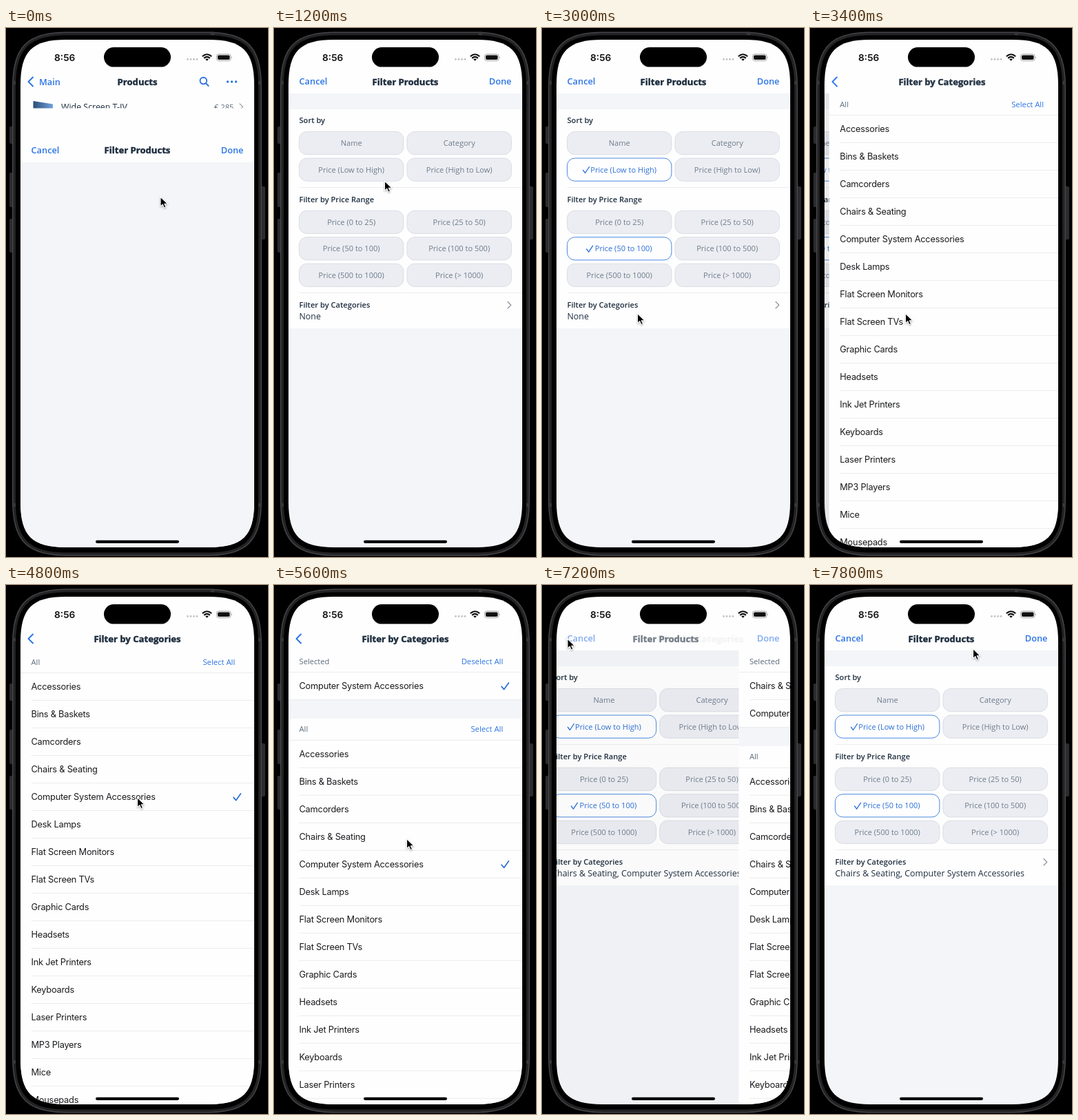
An HTML page for the animation above (8 s loop, 380 px wide and 768 px high).

```html
<!DOCTYPE html>
<html lang="en">
<head>
<meta charset="utf-8">
<title>Filter products</title>
<style>
html, body { margin: 0; width: 100%; height: 100%; overflow: hidden; background: #000; }
svg { display: block; width: 100%; height: 100%; }
text { font-family: "Open Sans", "Noto Sans", sans-serif; fill: #1d2d3e; white-space: pre; }
.title { font-size: 13.1px; font-weight: 700; stroke: #1d2d3e; stroke-width: .45px; }
.link { font-size: 12.8px; font-weight: 600; fill: #2b74e4; }
.label { font-size: 11.1px; font-weight: 600; }
.value { font-size: 12.4px; }
.chip { font-size: 11.05px; fill: #6c7c8c; }
.chip.on { fill: #2b6fd6; }
.group { font-size: 11.2px; fill: #5b6b7c; }
.action { font-size: 11.3px; fill: #2b74e4; }
.row { font-family: Inter, "Liberation Sans", sans-serif; font-size: 12.8px; letter-spacing: -.23px; fill: #1b1c1f; }
.clock { font-family: Inter, "Liberation Sans", sans-serif; font-size: 13.7px; font-weight: 600; fill: #111; }
.line { fill: none; stroke-linecap: round; stroke-linejoin: round; }
</style>
</head>
<body>
<svg viewBox="0 0 380 768" preserveAspectRatio="none">
  <defs>
    <clipPath id="glass"><path id="screen"/></clipPath>
    <clipPath id="body"><rect x="21" y="95" width="339" height="660"/></clipPath>
    <linearGradient id="screenPic" x1="0" x2="1">
      <stop offset="0" stop-color="#2d4d78"/><stop offset="1" stop-color="#6ea2dc"/>
    </linearGradient>
  </defs>
  <rect width="380" height="768" fill="#000"/>
  <g fill="#2c2c2f">
    <rect x="5" y="143" width="6" height="25" rx="2"/>
    <rect x="5" y="210" width="6" height="50" rx="2"/>
    <rect x="5" y="277" width="6" height="49" rx="2"/>
    <rect x="369" y="230" width="7" height="77" rx="2"/>
  </g>
  <path id="rim" fill="#454548"/>
  <path id="band" fill="#232325"/>
  <g fill="#38383a">
    <rect x="9" y="77" width="5" height="5"/><rect x="366" y="77" width="5" height="5"/>
    <rect x="9" y="690" width="5" height="5"/><rect x="366" y="690" width="5" height="5"/>
    <rect x="297" y="5.5" width="5" height="5"/>
  </g>
  <path id="bezel" fill="#000"/>
  <g clip-path="url(#glass)">
    <g id="app"></g>
    <text class="clock" x="70" y="47.5">8:56</text>
    <g fill="#c3c3c6">
      <circle cx="263.5" cy="45.5" r="1.4"/><circle cx="268" cy="45.5" r="1.4"/>
      <circle cx="272.5" cy="45.5" r="1.4"/><circle cx="277" cy="45.5" r="1.4"/>
    </g>
    <path d="M284.8 41.3Q291.5 35.2 298.2 41.3M287.2 43.9Q291.5 40 295.8 43.9" fill="none" stroke="#111" stroke-width="2.1"/>
    <path d="M289.2 45.4Q291.5 43.6 293.8 45.4L291.5 47.8Z" fill="#111"/>
    <rect x="305.5" y="38" width="20.5" height="9.6" rx="3" fill="#fff" stroke="#97979b" stroke-width=".9"/>
    <rect x="307" y="39.5" width="17.5" height="6.6" rx="1.8" fill="#111"/>
    <path d="M327.3 41.2q1.6 1.6 0 3.3z" fill="#97979b"/>
    <rect x="142" y="28" width="97" height="28.6" rx="14.3" fill="#000"/>
    <rect x="130" y="743.7" width="121" height="4.2" rx="2.1" fill="#000"/>
  </g>
  <path id="cursor" d="M0 0V14.2L3.3 11.1L5.5 16.2L8 15.1L5.8 10.2H10.3Z" fill="#000" stroke="#fff" stroke-width="1.1" stroke-linejoin="round" style="filter:drop-shadow(0 1px 1px #0005)"/>
</svg>
<script>
const LOOP = 8000, STEP = 200, LEFT = 21, WIDTH = 339;
const BLUE = "#2b6fd6", PAPER = "#f4f5f8", RULE = "#ebecef", WHITE = "#fefefe";
const $ = id => document.getElementById(id);
const app = $("app"), cursor = $("cursor");

const categories = ["Accessories", "Bins & Baskets", "Camcorders", "Chairs & Seating",
  "Computer System Accessories", "Desk Lamps", "Flat Screen Monitors", "Flat Screen TVs",
  "Graphic Cards", "Headsets", "Ink Jet Printers", "Keyboards", "Laser Printers",
  "MP3 Players", "Mice", "Mousepads"];

// time, x, y
const path = [[0, 224, 245], [400, 222, 244], [1200, 160.5, 222], [1400, 132, 208], [1600, 130, 206],
  [2200, 122, 318], [2400, 122, 318], [3000, 138.5, 414.5], [3600, 138.5, 414.5],
  [4400, 190.5, 308.5], [5000, 190.5, 308.5], [5600, 192.5, 368.5], [6400, 192.5, 368.5],
  [7000, 37, 78], [7200, 37, 78], [7800, 236.5, 92.5]];
const slide = [[3000, 0], [3200, .78], [3400, .98], [3600, 1], [7000, 1], [7200, .22], [7400, .02], [7600, 0]];
const rise = [[0, 99.5], [200, 7], [400, 0]];

function at(keys, t, col = 1, ease = u => u) {
  if (t <= keys[0][0]) return keys[0][col];
  const i = keys.findIndex(k => k[0] >= t);
  if (i < 0) return keys[keys.length - 1][col];
  const a = keys[i - 1], b = keys[i];
  return a[col] + (b[col] - a[col]) * ease((t - a[0]) / (b[0] - a[0]));
}
const smooth = u => u * u * (3 - 2 * u);

// rounded box whose corners ease into the sides
function softBox(id, x, y, w, h, r) {
  const e = r * 1.35, c = r * .34, X = x + w, Y = y + h;
  $(id).setAttribute("d", `M${x + e} ${y}H${X - e}C${X - c} ${y} ${X} ${y + c} ${X} ${y + e}` +
    `V${Y - e}C${X} ${Y - c} ${X - c} ${Y} ${X - e} ${Y}H${x + e}` +
    `C${x + c} ${Y} ${x} ${Y - c} ${x} ${Y - e}V${y + e}C${x} ${y + c} ${x + c} ${y} ${x + e} ${y}Z`);
}

const text = (s, x, y, cls, anchor = "start") =>
  `<text class="${cls}" x="${x}" y="${y}" text-anchor="${anchor}">${s.replace(/&/g, "&amp;")}</text>`;
const rect = (x, y, w, h, fill) => `<rect x="${x}" y="${y}" width="${w}" height="${h}" fill="${fill}"/>`;
const rule = (y, x = 36.5) => rect(x, y, 360 - x, 1, RULE);
const line = (d, color, width) => `<path class="line" d="${d}" stroke="${color}" stroke-width="${width}"/>`;
const group = (s, x = 0, y = 0, opacity = 1) =>
  `<g transform="translate(${x} ${y})" opacity="${opacity}">${s}</g>`;
const backArrow = line("M39 71.5L32.5 78L39 84.5", "#2b74e4", 2);

function productsPage() {
  return rect(LEFT, 17, WIDTH, 737, WHITE) + backArrow +
    text("Main", 48, 82.5, "link") + text("Products", 190.5, 82.5, "title", "middle") +
    `<circle cx="286.3" cy="76.6" r="4.8" fill="none" stroke="#2b74e4" stroke-width="1.9"/>` +
    line("M290 80.4L293.6 84", "#2b74e4", 2) +
    [321.5, 327.5, 333.5].map(x => `<circle cx="${x}" cy="78" r="1.7" fill="#2b74e4"/>`).join("") +
    `<path d="M39.5 106L68 110.5V124H39.5Z" fill="url(#screenPic)"/>` +
    text("Wide Screen T-IV", 80, 119, "value") + text("€ 285", 330.5, 119, "group", "end") +
    line("M339 110L343.5 114.5L339 119", "#9aa2ab", 1.2);
}

function chip(label, col, y, on) {
  const x = col ? 193 : 36.5, mid = x + 75.7, half = label.length * 2.53;
  return `<rect x="${x}" y="${y}" width="151.4" height="33.2" rx="11" fill="${on ? WHITE : "#ecedf2"}" stroke="${on ? "#4b88e0" : "#dadde3"}"/>` +
    text(label, mid + (on ? 6 : 0), y + 20.6, on ? "chip on" : "chip", "middle") +
    (on ? line(`M${mid - half - 4.5} ${y + 17.3}l3 4.2l6 -9`, BLUE, 1.3) : "");
}

function filterForm(t) {
  const low = t >= 1600, mid = t >= 2200, picked = t >= 5000;
  return rect(LEFT, 118, WIDTH, 318, WHITE) +
    text("Sort by", 36.5, 138.3, "label") +
    chip("Name", 0, 150.5) + chip("Category", 1, 150.5) +
    chip("Price (Low to High)", 0, 189, low) + chip("Price (High to Low)", 1, 189) +
    rule(231) + text("Filter by Price Range", 36.5, 253, "label") +
    chip("Price (0 to 25)", 0, 265.2) + chip("Price (25 to 50)", 1, 265.2) +
    chip("Price (50 to 100)", 0, 303.7, mid) + chip("Price (100 to 500)", 1, 303.7) +
    chip("Price (500 to 1000)", 0, 342.2) + chip("Price (> 1000)", 1, 342.2) +
    rule(384) + text("Filter by Categories", 36.5, 406.2, "label") +
    text(picked ? "Chairs & Seating, Computer System Accessories" : "None", 36.5, 422.8, "value") +
    line("M339 397.5L343.7 402.2L339 407", "#8f98a2", 1.3);
}

function section(name, action, items, chosen, y) {
  const rows = items.map((item, i) => {
    const mid = y + 51.8 + 40 * i;
    return text(item, 36.5, mid + 4.6, "row") + rule(mid + 19.2) +
      (chosen.includes(item) ? line(`M330 ${mid + .6}l3.6 4.2l6.8 -9.6`, BLUE, 1.7) : "");
  });
  return text(name, 36.5, y + 19.5, "group") + text(action, 332.3, y + 19.5, "action", "end") +
    rule(y + 31, LEFT) + rows.join("");
}

function categoryList(t) {
  const chosen = categories.filter((c, i) => i === 4 && t >= 4600 || i === 3 && t >= 5800);
  const shown = t >= 5000 ? chosen : [];
  let out = rect(LEFT, 95, WIDTH, 660, WHITE), y = t >= 3600 ? 96 : 95;
  if (shown.length) {
    out += section("Selected", "Deselect All", shown, chosen, 95);
    y = 126 + 40 * shown.length;
    out += rect(LEFT, y, WIDTH, 28, PAPER) + rule(y, LEFT);
    y += 27.8;
  }
  return out + section("All", "Select All", categories, chosen, y);
}

function sheet(t) {
  const p = at(slide, t);
  let body = rect(LEFT, 95, WIDTH, 670, PAPER);
  if (t >= 400) {
    body += p < 1 ? group(filterForm(t), -101 * p) : "";
    if (p > 0) {
      const x = WIDTH * (1 - p);
      body += `<rect x="${LEFT}" y="95" width="${WIDTH}" height="660" opacity="${.07 * p}"/>` +
        group(categoryList(t), x);
    }
  }
  const fadeIn = p * p, fadeOut = (1 - p) ** 2;
  const form = text("Cancel", 36.5, 82.3, "link") + text("Done", 344.5, 82.3, "link", "end");
  return `<g clip-path="url(#body)">${body}</g>` + rect(LEFT, 17, WIDTH, 78, WHITE) +
    group(form, 0, 0, fadeOut) +
    group(text("Filter Products", 190.5, 82.5, "title", "middle"), -50 * p, 0, fadeOut) +
    group(text("Filter by Categories", 190.5, 82.5, "title", "middle"), 50 * (1 - p), 0, fadeIn) +
    group(backArrow, 0, 0, fadeIn);
}

function draw(t) {
  const lift = at(rise, t);
  app.innerHTML = (lift > 0 ? productsPage() : "") + group(sheet(t), 0, lift);
  cursor.setAttribute("transform", `translate(${at(path, t, 1, smooth)} ${at(path, t, 2, smooth)})`);
}

softBox("rim", 9, 5.5, 362, 761, 61);
softBox("band", 10.5, 7, 359, 758, 59.5);
softBox("bezel", 14, 10.5, 352, 751, 56);
softBox("screen", 21, 17, 339, 737, 49);

const start = performance.now();
let last = -1;
function tick(now) {
  const t = Math.floor(Math.max(0, now - start) % LOOP / STEP) * STEP;
  if (t !== last) draw(last = t);
  requestAnimationFrame(tick);
}
tick(start);
</script>
</body>
</html>
```
